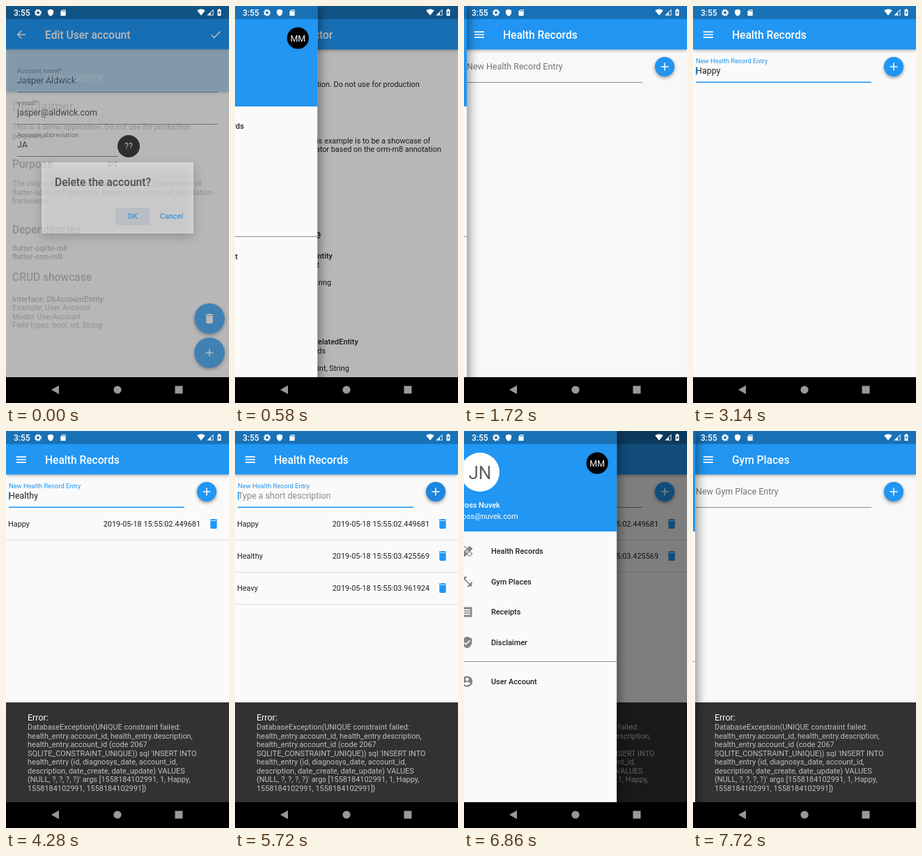
Write an HTML page with a canvas that moves like this. It is 320 px wide and 569 px high and loops after 8020 ms.

```html
<!DOCTYPE html>
<html lang="en">
<head>
<meta charset="utf-8">
<title>Records app demo</title>
<style>
html, body { margin: 0; width: 100%; height: 100%; overflow: hidden; background: #000; }
canvas { display: block; }
</style>
</head>
<body>
<canvas id="stage" width="320" height="569"></canvas>
<script>
const ctx = document.getElementById('stage').getContext('2d');
const BLUE = '#2196f3', INK = '#212121', GREY = '#757575', PAPER = '#fafafa';
const LOOP = 8020, DRAWER = 236.7;
// Type sizes
const SMALL = 9.35, BODY = 10.9, FIELD = 12.46, TITLE = 15.57, HEAD = 18.7;

const ICONS = {
  menu: 'M3 18h18v-2H3v2zm0-5h18v-2H3v2zm0-7v2h18V6H3z',
  add: 'M19 13h-6v6h-2v-6H5v-2h6V5h2v6h6v2z',
  back: 'M20 11H7.83l5.59-5.59L12 4l-8 8 8 8 1.41-1.41L7.83 13H20v-2z',
  check: 'M9 16.17L4.83 12l-1.42 1.41L9 19 21 7l-1.41-1.41z',
  trash: 'M6 19c0 1.1.9 2 2 2h8c1.1 0 2-.9 2-2V7H6v12zM19 4h-3.5l-1-1h-5l-1 1H5v2h14V4z',
  plaster: 'M17.7 12l4-4a1 1 0 0 0 0-1.4l-4.3-4.3a1 1 0 0 0-1.4 0l-4 4L8 2.3a1 1 0 0 0-1.4 0L2.3 6.6a1 1 0 0 0 0 1.4l4 4-4 4a1 1 0 0 0 0 1.4l4.3 4.3a1 1 0 0 0 1.4 0l4-4 4 4a1 1 0 0 0 1.4 0l4.3-4.3a1 1 0 0 0 0-1.4zM7.3 11L3.7 7.3l3.6-3.6 3.6 3.6zM16.7 20.3L13 16.7l3.7-3.6 3.6 3.6zM12 9a1 1 0 1 0 .01 0zM12 13a1 1 0 1 0 .01 0zM10 11a1 1 0 1 0 .01 0zM14 11a1 1 0 1 0 .01 0z',
  weight: 'M20.57 14.86L22 13.43 20.57 12 17 15.57 8.43 7 12 3.43 10.57 2 9.14 3.43 7.71 2 5.57 4.14 4.14 2.71 2.71 4.14l1.43 1.43L2 7.71l1.43 1.43L2 10.57 3.43 12 7 8.43 15.57 17 12 20.57 13.43 22l1.43-1.43L16.29 22l2.14-2.14 1.43 1.43 1.43-1.43-1.43-1.43L22 16.29z',
  receipt: 'M18 17H6v-2h12v2zm0-4H6v-2h12v2zm0-4H6V7h12v2zM3 22l1.5-1.5L6 22l1.5-1.5L9 22l1.5-1.5L12 22l1.5-1.5L15 22l1.5-1.5L18 22l1.5-1.5L21 22V2l-1.5 1.5L18 2l-1.5 1.5L15 2l-1.5 1.5L12 2l-1.5 1.5L9 2 7.5 3.5 6 2 4.5 3.5 3 2v20z',
  verified: 'M12 1L3 5v6c0 5.55 3.84 10.74 9 12 5.16-1.26 9-6.45 9-12V5l-9-4zm-2 16l-4-4 1.41-1.41L10 14.17l6.59-6.59L18 9l-8 8z',
  shield: 'M12 1L3 5v6c0 5.55 3.84 10.74 9 12 5.16-1.26 9-6.45 9-12V5z',
  person: 'M12 2a10 10 0 1 0 .01 0zM12 5a3 3 0 1 1-.01 0zM12 19.2c-2.5 0-4.7-1.3-6-3.2 0-2 4-3.1 6-3.1s6 1.1 6 3.1c-1.3 1.9-3.5 3.2-6 3.2z',
  card: 'M18 2h-8L4 8v12c0 1.1.9 2 2 2h12c1.1 0 2-.9 2-2V4c0-1.1-.9-2-2-2zm-6 6h-2V4h2v4zm3 0h-2V4h2v4zm3 0h-2V4h2v4z',
  wifi: 'M12 21L.5 7C4 4.300 8 3 12 3s8 1.300 11.500 4z',
  signal: 'M2 22h20V2zM14 20V12.800L20 6.800V20z',
  battery: 'M16 4h-2V2h-4v2H8c-.6 0-1 .5-1 1v16c0 .6.400 1 1 1h8c.6 0 1-.400 1-1V5c0-.500-.400-1-1-1zM11 19v-5H9l4-7v5h2z'
};
for (const name in ICONS) ICONS[name] = new Path2D(ICONS[name]);

function rect(x, y, w, h, color) {
  ctx.fillStyle = color;
  ctx.fillRect(x, y, w, h);
}

// y is the middle of the capital letters
function text(str, x, y, size, color = INK, weight = 400, align = 'left') {
  ctx.font = `${weight} ${size}px Roboto, sans-serif`;
  ctx.textAlign = align;
  ctx.fillStyle = color;
  ctx.fillText(str, x, y + size * 0.36);
}

function icon(name, x, y, size = 18.7, color = '#fff') {
  ctx.save();
  ctx.translate(x - size / 2, y - size / 2);
  ctx.scale(size / 24, size / 24);
  ctx.fillStyle = color;
  ctx.fill(ICONS[name], 'evenodd');
  ctx.restore();
}

function disc(x, y, r, color) {
  ctx.fillStyle = color;
  ctx.beginPath();
  ctx.arc(x, y, r, 0, 2 * Math.PI);
  ctx.fill();
}

function shadowed(blur, dx, dy, alpha, draw) {
  ctx.save();
  ctx.shadowColor = `rgba(0,0,0,${alpha})`;
  ctx.shadowBlur = blur;
  ctx.shadowOffsetX = dx;
  ctx.shadowOffsetY = dy;
  draw();
  ctx.restore();
}

function fab(name, x, y, r, color = BLUE) {
  shadowed(5, 0, 2, 0.4, () => disc(x, y, r, color));
  icon(name, x, y);
}

function scaffold(title, nav) {
  rect(0, 0, 320, 569, PAPER);
  shadowed(5, 0, 2, 0.35, () => rect(0, 0, 320, 62.3, BLUE));
  icon(nav, 21.8, 41);
  text(title, 56, 41, TITLE, '#fff', 500);
}

function disclaimerPage() {
  scaffold('Gymspector', 'menu');
  text('Disclaimer', 9, 81.500, HEAD, GREY);
  const heading = (str, y) => text(str, 9, y, TITLE, INK, 500);
  const lines = (y, ...strs) => strs.forEach((s, i) => text(s, 9, y + i * 12.46, BODY));
  const strong = (str, y) => text(str, 9, y, BODY, INK, 500);
  lines(112, 'This is a demo application. Do not use for production', 'purposes.');
  heading('Purpose', 165);
  lines(193, 'The only purpose of this example is to be a showcase of',
    'flutter-sqlite-m8 generator based on the orm-m8 annotation', 'framework');
  heading('Dependencies', 258.500);
  strong('flutter-sqlite-m8', 285.500);
  strong('flutter-orm-m8', 298);
  heading('CRUD showcase', 327);
  strong('Interface: DbAccountEntity', 358.500);
  lines(371, 'Example: User Account', 'Model: UserAccount', 'Field types: bool, int, String');
  strong('Interface: DbAccountRelatedEntity', 481.500);
  lines(494, 'Example: Health Records', 'Model: HealthEntry', 'Field types: DateTime, int, String');
}

function editPage() {
  scaffold('Edit User account', 'back');
  icon('check', 301, 41);
  const field = (label, value, y, right) => {
    text(label, 16, y, SMALL, GREY);
    text(value, 16, y + 14, FIELD);
    rect(16, y + 30, right - 16, 1, '#777');
  };
  field('Account name*', 'Jasper Aldwick', 93, 304);
  field('e-mail*', 'jasper@aldwick.com', 139, 304);
  field('Account abbreviation', 'JA', 185, 160);
  text('2/2', 160, 227, SMALL, GREY, 400, 'right');
  disc(176, 201, 16, '#000');
  text('??', 176, 201, FIELD, '#fff', 400, 'center');
  fab('trash', 292, 448, 21.8);
  fab('add', 292, 497, 21.8);
}

function dialog() {
  ctx.globalAlpha = 0.5;
  shadowed(14, 0, 5, 0.4, () => rect(51, 224, 218, 102, '#fff'));
  ctx.globalAlpha = 1;
  rect(157, 289, 49, 25, 'rgba(70,120,160,.13)');
  text('Delete the account?', 70, 252.500, TITLE, '#505050', 500);
  text('OK', 181.500, 301.500, BODY, '#3d95db', 500, 'center');
  text('Cancel', 237.500, 301.500, BODY, '#3d95db', 500, 'center');
}

function entryPage(title, label, { focused, value, rows, pressed }) {
  scaffold(title, 'menu');
  if (focused) {
    text(label, 4, 78.500, SMALL, BLUE);
    text(value || 'Type a short description', 4, 93, FIELD, value ? INK : '#8a8a8a');
    rect(4, 87, 1.500, 12, BLUE);
    rect(4, 108.500, 252, 1.600, BLUE);
  } else {
    text(label, 4, 87, FIELD, GREY);
    rect(4, 109, 252, 1, '#8a8a8a');
  }
  fab('add', 288, 87, 14, pressed ? '#1e86dc' : BLUE);
  rows.forEach(([name, seconds], i) => {
    const y = 133 + i * 46;
    text(name, 3, y, BODY);
    text('2019-05-18 15:55:' + seconds, 279, y, BODY, INK, 400, 'right');
    icon('trash', 298, y, 18.7, BLUE);
    rect(0, y + 23, 320, 1, '#dedede');
  });
}

const ERROR = [
  'DatabaseException(UNIQUE constraint failed:',
  'health_entry.account_id, health_entry.description,',
  'health_entry.account_id (code 2067',
  "SQLITE_CONSTRAINT_UNIQUE)) sql 'INSERT INTO",
  'health_entry (id, diagnosys_date, account_id,',
  'description, date_create, date_update) VALUES',
  "(NULL, ?, ?, ?, ?)' args [1558184102991, 1, Happy,",
  '1558184102991, 1558184102991]}'
];

function snackbar(shown) {
  if (!shown) return;
  const top = 532 - 143 * shown;
  rect(0, top, 320, 143, '#323232');
  text('Error:', 31, top + 22, FIELD, '#fff');
  ERROR.forEach((line, i) => text(line, 31, top + 35.500 + i * 12.46, BODY, '#c1c1c1'));
}

const MENU = [
  ['plaster', 'Health Records', 172.500], ['weight', 'Gym Places', 216],
  ['receipt', 'Receipts', 259.500], ['verified', 'Disclaimer', 303],
  ['person', 'User Account', 359]
];

function drawer(open) {
  if (open < 0.001) return;
  rect(0, 0, 320, 569, `rgba(0,0,0,${0.54 * open})`);
  ctx.save();
  ctx.translate(DRAWER * (open - 1), 0);
  shadowed(14, 3, 0, 0.45, () => rect(0, 0, DRAWER, 569, PAPER));
  rect(0, 0, DRAWER, 144, BLUE);
  disc(40.500, 59, 28, '#fff');
  text('JN', 40.500, 59.500, 26, '#606060', 400, 'center');
  text('Joss Nuvek', 12.46, 106.500, BODY, '#fff', 500);
  text('joss@nuvek.com', 12.46, 122, BODY, '#fff');
  disc(DRAWER - 28, 46, 15.600, '#000');
  text('MM', DRAWER - 28, 46.500, FIELD, '#fff', 400, 'center');
  for (const [name, label, y] of MENU) {
    icon(name, 22, y, 18.7, '#858585');
    text(label, 56.500, y, BODY, INK, 500);
  }
  rect(0, 330, DRAWER, 1, '#8f8f8f');
  ctx.restore();
}

function systemBars() {
  rect(0, 0, 320, 18.7, 'rgba(0,0,0,.25)');
  text('3:55', 11, 9.500, 12, '#fff', 500);
  ctx.strokeStyle = '#fff';
  for (const [r, width, dash] of [[3, 2, []], [4.400, 1.500, [1.73, 1.73]]]) {
    ctx.lineWidth = width;
    ctx.setLineDash(dash);
    ctx.beginPath();
    ctx.arc(46, 9.500, r, 0, 2 * Math.PI);
    ctx.stroke();
  }
  icon('shield', 64, 9.500, 11);
  icon('card', 82, 9.500, 11);
  icon('wifi', 280, 9, 12);
  icon('signal', 293, 9, 11);
  icon('battery', 306, 9, 12);

  rect(0, 532, 320, 37, '#000');
  ctx.fillStyle = '#999';
  ctx.fill(new Path2D('M65 550L76 543.800V556.200z'));
  disc(160, 550, 5.600, '#999');
  rect(242.500, 544.500, 11, 11, '#999');
}

// Decelerating 0 to 1
function slide(t, start, duration = 246) {
  const p = Math.min(1, Math.max(0, (t - start) / duration));
  return 1 - (1 - p) ** 2;
}

// [text, from, to]
const TYPED = [['Happy', 2750, 3400], ['Happy', 3600, 3940], ['Healthy', 4100, 4375], ['Heavy', 4700, 4912]];
// [name, seconds, added, deleted]
const RECORDS = [
  ['Happy', '02.449681', 3400, LOOP], ['Healthy', '03.425569', 4375, LOOP], ['Heavy', '03.961924', 4912, 6150]
];

function leavingScene() {
  editPage();
  ctx.save();
  ctx.globalAlpha = 0.25;
  ctx.translate(0, 61.500);
  disclaimerPage();
  ctx.restore();
  rect(0, 0, 320, 569, 'rgba(0,0,0,.27)');
  dialog();
}

function render(t) {
  if (t < 280) {
    leavingScene();
  } else {
    if (t < 1506) disclaimerPage();
    else if (t < 7502) entryPage('Health Records', 'New Health Record Entry', {
      focused: t > 2750 && t < 6500,
      value: TYPED.find(([, from, to]) => t >= from && t < to)?.[0],
      rows: RECORDS.filter(([, , from, to]) => t >= from && t < to),
      pressed: t > 5000 && t < 5900
    });
    else entryPage('Gym Places', 'New Gym Place Entry', { rows: [] });
    snackbar(slide(t, 3940, 250));
    drawer(slide(t, 508) - slide(t, 1506) + slide(t, 6681) - slide(t, 7502));
  }
  systemBars();
}

// The screen refreshes 3.5 times a second, aligned to 20 ms ticks
function tick() {
  const now = performance.now() % LOOP;
  const step = Math.min(27, Math.floor((Math.floor(now / 20) + 0.5) * 0.07));
  render(20 * Math.round(step * 100 / 7));
  requestAnimationFrame(tick);
}
tick();
</script>
</body>
</html>
```
